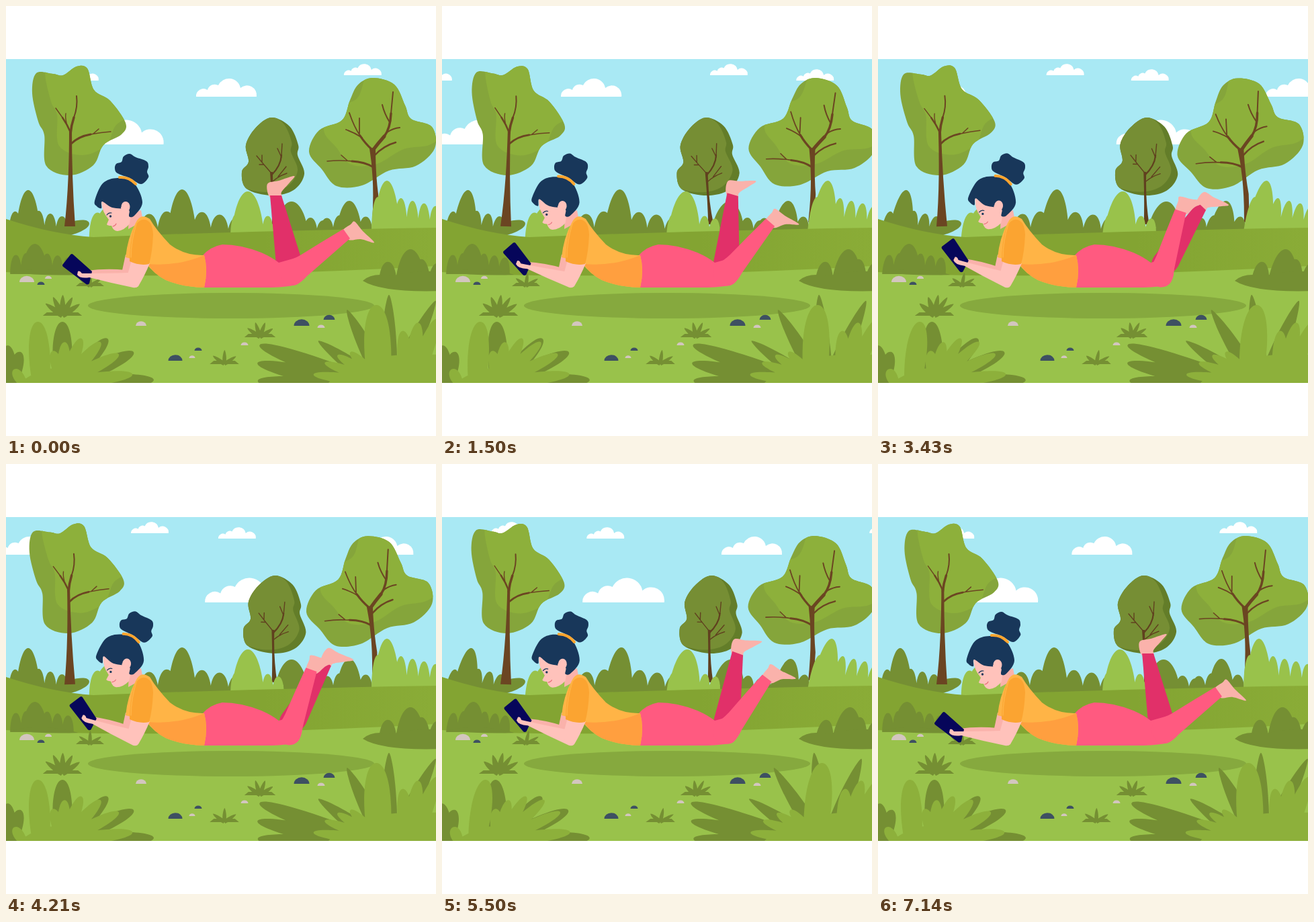
An HTML page that plays this animation: 640x640 px, repeating every 7210 ms.

```html
<!DOCTYPE html>
<html lang="en">
<head>
<meta charset="utf-8">
<title>Reading in the park</title>
<style>
html, body { margin: 0; height: 100%; overflow: hidden; background: #fff; }
svg { display: block; width: 100%; height: 100%; }
</style>
</head>
<body>
<script>
const LOOP = 7210;
const DARK = '#758f33', LIGHT = '#99c24b', MID = '#8db03b', SHADE = '#85a53b';
const BROWN = '#6b4522', NAVY = '#18375a', PINK = '#ff5a80', ROSE = '#e13069';
const SKIN = '#ffc2bb', SKIN2 = '#fab2ab', PALE = '#d3c6bf', SLATE = '#3e5062';

// Motion: each rule maps loop progress 0..1 to a factor.
const ease = u => (1 - Math.cos(Math.PI * Math.min(1, u))) / 2;
const kick = p => ease(2 * p) - (p > .5 ? ease(2 * p - 1) : 0);
const nod = p => ease(Math.min(p, 1 - p) / .32);
const breeze = p => Math.sin(3 * Math.PI * p);

function keyed(p, keys) {
  const i = Math.max(1, keys.findIndex(k => k[0] >= p));
  const [a, from] = keys[i - 1], [b, to] = keys[i];
  return from + (to - from) * ease((p - a) / (b - a));
}
const wobble = p => keyed(p, [[0, 0], [.13, -1.6], [.48, 1.9], [.75, 2.3], [1, 0]]);

// Three gusts, each rising and falling once.
const gust = p => {
  const [a, b] = p < .28 ? [0, .28] : p < .585 ? [.28, .585] : [.585, 1];
  return Math.sin(Math.PI * (p - a) / (b - a)) ** 2;
};

const moves = [];
const moving = (inner, transform) => `<g data-i="${moves.push(transform) - 1}">${inner}</g>`;
const turn = (inner, x, y, angle, rule) =>
  moving(inner, p => `rotate(${angle * rule(p)} ${x} ${y})`);
const sway = (inner, y, k) => moving(inner, p => {
  const s = k * gust(p);
  return `matrix(1 0 ${-s} 1 ${s * y} 0)`;
});

// Shapes
const fill = (color, d, extra = '') => `<path fill="${color}" d="${d}" ${extra}/>`;
const line = (color, w, d) =>
  `<path fill="none" stroke="${color}" stroke-width="${w}" stroke-linecap="round" d="${d}"/>`;

// Closed smooth curve through a few points.
function smooth(text) {
  const p = text.split(', ').map(pair => pair.split(' ').map(Number));
  const at = i => p[(i + p.length) % p.length];
  let d = `M${p[0]}`;
  p.forEach((b, i) => {
    const a = at(i - 1), c = at(i + 1), e = at(i + 2);
    d += `C${b[0] + (c[0] - a[0]) / 6} ${b[1] + (c[1] - a[1]) / 6} `
       + `${c[0] - (e[0] - b[0]) / 6} ${c[1] - (e[1] - b[1]) / 6} ${c}`;
  });
  return d + 'Z';
}

// One leaf of half width w from (x, y); round is the bluntness of its tip.
function leaf(x, y, angle, len, w, round = .75, foot = .7) {
  const a = angle * Math.PI / 180, sin = Math.sin(a), cos = Math.cos(a);
  const p = (f, s) => `${x + sin * len * f + cos * w * s} ${y - cos * len * f + sin * w * s}`;
  return `M${p(0, -foot)}C${p(.55, -1.1)} ${p(1, -round)} ${p(1, 0)}`
       + `C${p(1, round)} ${p(.55, 1.1)} ${p(0, foot)}Z`;
}

// Leaves spread evenly over an angle, their length running from r0 to r1.
function fan(x, y, n, [a0, a1], [r0, r1], w, round) {
  let d = '';
  for (let i = 0; i < n; i++) {
    const u = n > 1 ? i / (n - 1) : 0;
    d += leaf(x, y, a0 + (a1 - a0) * u, r0 + (r1 - r0) * u, w, round);
  }
  return d;
}

// One tall lobe among lower ones, which shrink away from it.
function hedge(color, x0, x1, peak, top, base, k, low = .53, n = 6, w = 18) {
  const h = base - top, step = (x1 - x0) / n;
  let d = leaf(peak, base, 0, h, w, .6, 1.2) + `M${x0} ${base}V${base - h * .2}H${x1}V${base}Z`;
  for (let i = 0; i < n; i++) {
    const x = x0 + (i + .5) * step, far = Math.abs(x - peak);
    if (far > w * .7) d += leaf(x, base, 0, h * low * (1 - .5 * far / (x1 - x0)), step * .5, .7, 1.1);
  }
  return sway(fill(color, d), base, k);
}

function sprout(x, y, n, r) {
  const w = r * .75, d = fan(x, y, n, [-54, 56], [r, r], r * .17, .25);
  return sway(fill(DARK, d + `M${x - w - 6} ${y}L${x - w} ${y - 5}H${x + w}L${x + w + 6} ${y}Z`), y, .2);
}

const stone = color => ([x, y, w]) =>
  fill(color, `M${x - w / 2} ${y}A${w / 2} ${w * .42} 0 0 1 ${x + w / 2} ${y}Z`);

// A pair of clouds: one leaves the spot x, the next arrives there as the loop
// closes. Each has a speed and a gain, in pixels and seconds.
function cloud(x, y, size, leave, arrive) {
  const shape = fill('#fff', 'M0 0A11 11 0 0 1 17 -10A11 11 0 0 1 33 -17A17.5 17.5 0 0 1 66 -13A14.5 14.5 0 0 1 90 0Z');
  const path = (s, [v, gain]) => x + v * s + gain * s * Math.abs(s);
  const place = left => `translate(${left} ${y}) scale(${size})`;
  return moving(shape, p => place(path(-p * LOOP / 1000, leave)))
    + moving(shape, p => place(path((1 - p) * LOOP / 1000, arrive)));
}

function sky() {
  return fill('#a9e9f4', 'M0 79H640V561H0Z')
    + cloud(283, 135, 1, [70.6, 0], [77.8, 0])
    + cloud(503, 103, .62, [66, 2.2], [78, 0])
    + cloud(82, 111, .62, [82, 0], [78, 0])
    + cloud(113, 206, 1.35, [82.5, 0], [50, 3.7]);
}

// The second tone is the same outline, shifted and clipped.
function crown(id, outline, base, tone, dx, dy) {
  const d = smooth(outline);
  return `<clipPath id="${id}"><path d="${d}"/></clipPath>` + fill(base, d)
    + `<g clip-path="url(#${id})">${fill(tone, d, `transform="translate(${dx} ${dy})"`)}</g>`;
}

function leftTree() {
  return turn(
    crown('crownL', '39 130, 45 100, 70 101, 85 103, 105 90, 121 93, 131 125, 155 141, 178 174, 172 191, 145 207, 130 237, 95 252, 60 238, 57 192, 48 172',
      SHADE, MID, 19, -30)
    + fill(BROWN, 'M94 184L98 186Q98 260 103 328H87Q94 270 94 184Z')
    + line(BROWN, 3.5, 'M96 190Q97 178 101 166') + line(BROWN, 2, 'M101 166Q107 150 105 134')
    + line(BROWN, 2.5, 'M96 188Q91 176 84 166') + line(BROWN, 1.4, 'M84 166L74 152M90 174Q88 166 89 160')
    + line(BROWN, 2.8, 'M97 205Q108 194 126 191') + line(BROWN, 1.5, 'M126 191Q142 188 156 187M130 190L138 183'),
    95, 328, 1.7, breeze);
}

function smallTree() {
  const bark = '#60401f';
  return turn(
    crown('crownM', '395 166, 422 179, 435 207, 434 222, 444 250, 428 274, 395 282, 358 272, 351 247, 361 232, 357 207, 371 182',
      '#637d29', '#768e34', -10, -5)
    + fill(bark, 'M393 247H397Q397 290 404 325H396Q396 290 393 247Z')
    + line(bark, 2.2, 'M395 252Q409 238 410 222')
    + line(bark, 1.4, 'M410 222L411 205M410 225L404 212M396 250L383 235L373 223M384 236H377M381 232V222M397 261Q406 253 418 249M405 254L417 239'),
    400, 315, 1, wobble);
}

function rightTree() {
  return turn(
    crown('crownR', '512 140, 524 117, 546 107, 578 117, 594 148, 603 168, 634 180, 638 212, 610 238, 570 245, 530 267, 492 268, 470 243, 451 217, 466 185, 500 170',
      SHADE, MID, 22, -32)
    + fill(BROWN, 'M541 212L550 211Q550 250 554 280L553 322H545Q549 260 541 212Z')
    + line(BROWN, 5, 'M545 216Q554 204 563 194') + line(BROWN, 3.5, 'M563 194Q572 182 573 160')
    + line(BROWN, 2, 'M573 160L576 128M571 173Q563 160 560 147M567 188Q576 182 586 181')
    + line(BROWN, 3.2, 'M545 214Q534 204 527 193') + line(BROWN, 1.8, 'M527 193Q518 180 511 159M530 196Q518 188 506 184M526 190V167')
    + line(BROWN, 2.5, 'M549 222Q562 208 580 203') + line(BROWN, 3, 'M547 240Q534 232 515 231')
    + line(BROWN, 1.6, 'M515 231Q496 229 478 231M508 230L499 222'),
    549, 325, 3, breeze);
}

function backBushes() {
  return smallTree() + rightTree()
    + hedge(LIGHT, 125, 215, 152, 299, 346, .07, .9, 4)
    + hedge(DARK, 200, 357, 262, 273, 347, .07, .6)
    + hedge(DARK, 405, 482, 425, 291, 342, .1, .65, 4, 21)
    + hedge(DARK, 468, 545, 511, 290, 342, .16, .65, 4, 16)
    + hedge(LIGHT, 335, 413, 360, 276, 342, .08, .55, 5, 20)
    + hedge(LIGHT, 545, 665, 567, 260, 336, .18, .72, 7, 16)
    + hedge(DARK, 5, 92, 33, 274, 342, .16, .6, 5, 15)
    + fill(DARK, leaf(74, 338, 73, 52, 11))
    + leftTree();
}

function ground() {
  const pale = [[31, 411, 22], [63, 406, 10], [201, 476, 16], [277, 524, 9], [355, 505, 11], [469, 479, 11]];
  const slate = [[52, 415, 11], [252, 528, 21], [286, 513, 11], [440, 476, 23], [481, 467, 17]];
  return '<linearGradient id="hill"><stop offset=".6" stop-color="#83a432"/><stop offset="1" stop-color="#8aac37"/></linearGradient>'
    + fill('url(#hill)', 'M0 317Q70 340 130 344Q380 334 640 330V430H0Z')
    + fill(LIGHT, 'M0 396Q120 404 320 400Q500 395 640 387V561H0Z')
    + hedge(DARK, 7, 100, 43, 354, 399, .09, .75, 6, 16)
    + fill(DARK, 'M7 396Q60 386 108 400Q50 402 7 396Z')
    + hedge(DARK, 556, 655, 602, 362, 418, .1, .8, 4, 19)
    + fill(DARK, 'M531 409Q545 396 575 402Q610 392 650 396V424Q560 427 531 409Z')
    + '<ellipse cx="335" cy="446" rx="213" ry="19" fill="#86a93e"/>'
    + sprout(84, 461, 5, 31) + sprout(378, 493, 4, 23)
    + sprout(325, 533, 3, 21) + sprout(125, 417, 3, 20)
    + pale.map(stone(PALE)).join('') + slate.map(stone(SLATE)).join('');
}

function legs() {
  const far = fill(SKIN2, smooth('393 285, 389 265, 406 260, 429 253, 422 263, 410 277, 410 285'))
    + fill(ROSE, 'M393 282H410L438 371Q442 390 425 402Q404 402 402 384Z');
  const near = fill(SKIN2, smooth('501 335, 513 325, 519 321, 531 335, 548 352, 528 347, 510 348'))
    + fill(PINK, 'M502 332L512 346L448 402Q440 411 432 415Q424 418 415 412L406 400L410 382Q426 378 438 371Q470 351 502 332Z');
  return turn(far, 422, 390, 44, kick)
    + fill(PINK, 'M292 372Q304 358 322 355Q350 355 380 367Q396 374 406 382L438 373L440 400Q438 411 430 415Q420 418 395 419H293Z')
    + turn(near, 428, 407, -37.1, kick);
}

function torso() {
  return fill(SKIN2, 'M183 310L201 304L204 320L182 332Z')
    + fill(SKIN2, 'M178 370L190 374L184 402L172 398Z')
    + fill('#ffb446', 'M193 323Q200 307 214 317Q224 334 244 355Q266 372 295 371Q301 393 295 419Q262 418 238 408Q220 399 208 382L178 374Q181 345 193 323Z')
    + fill('#ff9f3f', 'M211 384Q254 388 295 371Q301 393 295 419Q262 418 238 408Q222 400 211 384Z');
}

function arm() {
  const forearm = fill(SKIN2, 'M120 394Q150 390 178 393L180 403L124 404Z')
    + fill('#06065a', 'M96 370Q98 368 100 370L128 395L124 413Q121 416 118 413L85 388Q83 386 85 384Z')
    + fill(SKIN, 'M107 395Q110 393 113 398L122 398Q150 398 182 397Q202 400 197 417Q194 420 189 419Q155 412 124 404Q110 406 106 400Z');
  return turn(forearm, 192, 413, 15, nod)
    + fill(SKIN, 'M187 378L214 383Q206 402 197 417Q193 420 188 418Q178 408 182 396Z')
    + fill('#fba431', 'M190 332Q197 316 207 318Q218 320 219 340Q218 366 213 384Q199 387 184 380Q184 354 190 332Z')
    + line('#ffb446', 1.5, 'M194 324Q186 350 186 374');
}

function head() {
  const bun = smooth('162 242, 164 235, 172 232, 175 224, 184 220, 193 225, 209 231, 212 239, 210 247, 212 255, 201 265, 184 256, 166 249');
  const hair = smooth('132 290, 144 264, 166 256, 190 263, 203 292, 191 312, 183 313, 182 303, 158 300, 143 291, 142 301, 135 298');
  return turn(
    fill(NAVY, bun)
    + fill(SKIN, 'M142 288Q142 302 148 311L153 318L150 325Q151 327 157 327Q160 335 166 335Q176 334 184 324L187 300L172 284Z')
    + fill(NAVY, hair)
    + line('#ffa52e', 4, 'M169 255Q183 254 193 265')
    + `<ellipse cx="178" cy="299" rx="6.5" ry="8" fill="${SKIN}"/>`
    + fill(SKIN, 'M171 299L183 304V315L172 313Z')
    + `<circle cx="155.5" cy="313" r="1.7" fill="${NAVY}"/>`
    + line(NAVY, 1.2, 'M150 311Q153 307 157 308')
    + line('#e8707c', 1.1, 'M159 328Q163 327 164 324'),
    195, 315, 5.3, nod);
}

function foreground() {
  const y = 561;
  const leftDark = leaf(84, y, 0, 91, 17) + fan(90, y, 3, [43, 88], [90, 130], 13)
    + fan(8, y, 2, [-6, 16], [56, 48], 12);
  const leftLight = leaf(52, y, -3, 91, 18) + fan(85, y, 6, [-18, 83], [50, 104], 11)
    + leaf(25, y, -33, 24, 9) + `M20 ${y}Q80 515 150 ${y}Z`;
  const rightDark = fan(570, 575, 3, [-85, -70], [196, 205], 15)
    + fan(570, 575, 4, [-54, 27], [130, 153], 15, .25);
  const rightLight = leaf(555, y, -2, 116, 23) + fan(600, 575, 3, [-6, 21], [92, 117], 14)
    + fan(560, y, 4, [-83, -46], [103, 66], 9) + `M480 ${y}Q520 510 660 520V${y}Z`;
  return sway(fill(DARK, leftDark), y, -.05) + sway(fill(MID, leftLight), y, .2)
    + sway(fill(DARK, rightDark), y, -.13) + sway(fill(MID, rightLight), y, .13);
}

const layers = [sky, backBushes, ground, legs, torso, arm, head, foreground];
document.body.innerHTML = `<svg viewBox="0 0 640 640"><clipPath id="frame"><path d="M0 79H640V561H0Z"/></clipPath>
<g clip-path="url(#frame)">${layers.map(draw => draw()).join('')}</g></svg>`;

const groups = [...document.querySelectorAll('[data-i]')];
function frame(now) {
  const p = now % LOOP / LOOP;
  for (const g of groups) g.setAttribute('transform', moves[g.dataset.i](p));
  requestAnimationFrame(frame);
}
frame(0);
</script>
</body>
</html>
```
